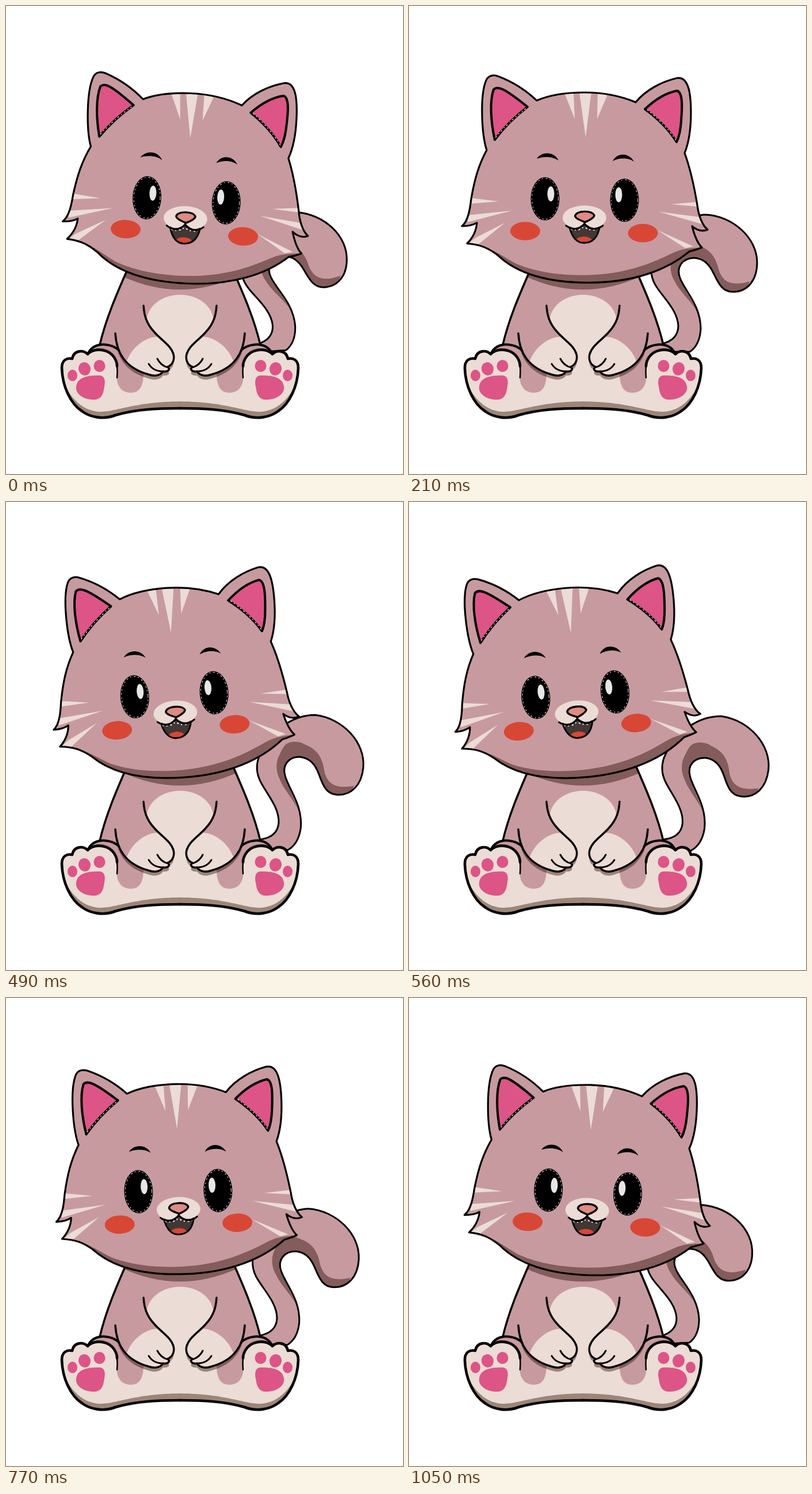
Write an HTML page with a canvas that moves like this. It is 690 by 812 pixels and loops after 1.12 s.

```html
<!DOCTYPE html>
<html lang="en">
<head>
<meta charset="utf-8">
<title>Kitten</title>
<style>
html, body { margin: 0; width: 100%; height: 100%; overflow: hidden; background: #fff; }
canvas { display: block; }
</style>
</head>
<body>
<canvas id="stage" width="690" height="812"></canvas>
<script>
const ctx = document.getElementById('stage').getContext('2d');
const FUR = '#c79aa0', SHADE = '#835c5b', CREAM = '#ebdcd5', DUSK = '#9b8679';
const PINK = '#dc5586', RED = '#d84735', INK = '#000';
const STEP = 70, HALF = 8, MID = 605;
const rad = Math.PI / 180;

function fill(d, color) {
  ctx.fillStyle = color;
  ctx.fill(new Path2D(d));
}

function line(d, width = 3.5, color = INK) {
  ctx.lineWidth = width;
  ctx.strokeStyle = color;
  ctx.stroke(new Path2D(d));
}

function oval(x, y, rx, ry, color, tilt = 0) {
  ctx.beginPath();
  ctx.ellipse(x, y, rx, ry, tilt * rad, 0, 7);
  ctx.fillStyle = color;
  ctx.fill();
}

function inside(d, draw) {
  ctx.save();
  ctx.clip(new Path2D(d));
  draw();
  ctx.restore();
}

function turned(x, y, deg, draw) {
  ctx.save();
  ctx.translate(x, y);
  ctx.rotate(deg * rad);
  ctx.translate(-x, -y);
  draw();
  ctx.restore();
}

function bothSides(draw) {
  draw();
  ctx.save();
  ctx.translate(MID, 0);
  ctx.scale(-1, 1);
  draw();
  ctx.restore();
}

function dashes(draw) {
  ctx.save();
  ctx.setLineDash([3, 4, 2, 5]);
  ctx.lineCap = 'butt';
  draw();
  ctx.restore();
}

// Darkens whatever lies just below a shape.
function castShadow(d, drop) {
  ctx.save();
  ctx.globalCompositeOperation = 'multiply';
  ctx.translate(0, drop);
  fill(d, '#a89892');
  ctx.restore();
}

const TAIL = 'M513,362 C562,363 605,402 605,445 C605,475 589,496 563,496 C546,496 539,484 530,465 ' +
  'C521,446 511,438 495,437 C474,438 464,454 471,472 C480,495 507,520 507,560 C506,580 500,592 488,600 ' +
  'L440,600 L440,586 C460,581 468,570 468,555 C467,530 446,510 432,490 C419,472 418,455 425,437 C437,400 472,366 513,362 Z';

function tail() {
  fill(TAIL, FUR);
  inside(TAIL, () => fill('M502,532 C487,508 470,495 462,478 C452,462 454,445 458,437 C462,424 466,416 473,414 ' +
    'C483,410 493,411 501,415 C517,420 526,428 531,438 C538,450 537,458 542,466 C549,480 564,486 592,478 ' +
    'L580,510 L540,500 L528,465 L495,438 L468,470 Z', SHADE));
  line(TAIL, 3);
}

const TORSO = 'M212,455 C196,492 174,540 163,592 L180,620 L425,620 L442,592 C431,540 409,492 393,455 Z';
const EDGE = 'M193,625 C193,615 186,602 172,598 C160,594 147,598 142,604 C134,596 118,597 115,612 ' +
  'C106,610 97,614 97,628 C98,660 112,690 132,703 C147,714 170,718 190,710 C225,700 260,698 304,698';
const BASE = EDGE + ' L304,590 L240,590 Z';
const ARM = 'M190,568 C192,600 205,628 250,640 C261,643 269,640 273,634 C283,635 286,630 281,626 ' +
  'C291,622 293,612 291,604 C286,588 270,580 258,566 C243,550 240,535 239,520';

function base() {
  fill(BASE, CREAM);
  inside(BASE, () => fill('M96,645 C113,685 135,702 162,704 C195,704 220,687 304,686 L304,720 L90,720 Z', DUSK));
}

function limbs() {
  const hip = 'M143,602 C150,588 165,586 176,588 C190,590 198,597 204,607';
  fill(hip + ' L193,645 C194,622 186,602 172,598 C160,594 147,598 143,602 Z', FUR);
  fill('M192,600 L193,650 C196,665 205,671 217,671 C232,671 239,660 239,636 L239,600 Z', FUR);
  line(hip, 4);
  line(EDGE, 4.6);
  line('M193,622 Q194,634 193,645', 2.5);

  oval(115.5, 641, 8.5, 10, PINK);
  oval(136.5, 629.5, 10.5, 11.5, PINK, -15);
  oval(162.5, 624.5, 10, 10.5, PINK);
  fill('M122,660 C124,645 140,641 160,641 C172,640 173,650 171,660 C169,675 165,684 150,683 C133,682 120,672 122,660 Z', PINK);

  castShadow(ARM + ' Z', 7);
  fill(ARM + ' Z', FUR);
  inside(ARM + ' Z', () => fill('M208,622 C217,590 246,572 268,574 L300,600 L290,645 L240,650 Z', CREAM));
  line(ARM);
  line('M263,612 Q269,624 281,627 M248,621 Q256,634 273,634', 3);
}

function body() {
  fill(TORSO, FUR);
  inside(TORSO, () => fill('M200,468 Q302,516 405,468 L405,440 L200,440 Z', SHADE));
  line('M212,455 C196,492 174,540 163,588 M393,455 C409,492 431,540 442,588');
  oval(302.5, 547, 58, 46, CREAM);
  fill('M246,550 H359 V620 H246 Z', CREAM);
  bothSides(base);
  bothSides(limbs);
}

const HEAD = 'M135,250 C126,222 123,155 134,129 C138,120 147,119 155,122 C179,131 203,146 222,164 ' +
  'C245,154 275,150 305,150 C340,150 370,157 394,167 C412,145 440,131 466,125 C486,122 490,152 490,185 ' +
  'C490,215 486,238 479,255 C490,285 496,315 501,345 C503,362 509,380 519,388 C510,392 500,389 492,382 ' +
  'C496,398 501,411 509,419 C502,422 495,424 487,426 C450,457 392,480 312,480 C245,480 190,466 155,433 ' +
  'C138,420 125,414 101,412 C111,402 117,390 118,376 C110,381 101,382 92,382 C103,373 106,352 108,335 C114,300 121,276 135,250 Z';
const EARS = ['M147,145 C154,138 165,142 206,175 C184,192 164,212 149,232 C142,200 140,165 147,145 Z',
  'M410,179 C430,160 450,150 466,147 C476,150 475,175 473,200 C472,215 469,228 465,236 C452,215 432,195 410,179 Z'];
const STRIPES = 'M271,153 L286,151 L288,196 Z M296,149 H317 L307,228 Z M328,151 L345,154 L327,196 Z ' +
  'M106,333 L106,343 L156,339 Z M102,363 L102,375 L179,355 Z M102,413 L116,402 L167,376 L121,413 Z ' +
  'M502,340 L502,348 L455,344 Z M504,366 L512,379 L434,357 Z M494,417 L480,420 L432,389 Z';

function eye(x, y, glintX, glintY) {
  oval(x, y, 25, 37.5, INK);
  dashes(() => {
    ctx.beginPath();
    ctx.ellipse(x, y, 23, 35.5, 0, 0, 7);
    ctx.lineWidth = 1;
    ctx.strokeStyle = '#fff';
    ctx.stroke();
  });
  oval(glintX, glintY, 6, 13, '#e6e6e6');
}

function mouth() {
  oval(305, 367.5, 38, 21.5, CREAM);
  const jaw = 'M279,384 Q292,391 305,378 Q318,391 331,384 C328,401 319,411 304,411 C290,411 283,400 279,384 Z';
  fill(jaw, '#423735');
  inside(jaw, () => oval(304, 409, 15, 9, RED));
  line(jaw, 3);
  dashes(() => line('M281,387 Q293,392 304,383 Q317,392 328,387', 2, '#fff'));
  line('M273,381 Q290,394 305,378 Q320,394 337,381 M305,372 V379', 3);
  const nose = 'M289,363 C293,355 317,354 322,363 C322,367 313,372 306,375 C298,372 287,368 289,363 Z';
  fill(nose, '#df8a82');
  line(nose, 3.4);
}

function head() {
  fill(HEAD, FUR);
  inside(HEAD, () => {
    fill(STRIPES, CREAM);
    fill('M101,412 C140,414 160,434 188,448 C225,463 265,467 305,467 C375,466 420,447 455,430 ' +
      'C475,420 490,420 509,419 L480,485 L150,485 Z', SHADE);
  });
  line(HEAD, 3.2);
  for (const ear of EARS) {
    fill(ear, PINK);
    line(ear, 4);
  }
  dashes(() => line('M203,178 C183,193 165,211 150,229 M414,180 C434,196 452,215 464,233', 1.2, '#fff'));
  fill('M222,265 C231,252 252,252 260,268 C250,261 235,260 222,265 Z', INK);
  fill('M354,269 C362,254 382,254 391,270 C381,263 366,263 354,269 Z', INK);
  eye(236.5, 334.5, 246.5, 326);
  eye(374.5, 337, 364.5, 327.5);
  oval(202, 390.5, 26, 16, RED);
  oval(406.5, 394, 26, 16, RED);
  mouth();
}

// The head starts its swing a little slower than it ends.
const swing = k => k * (0.87 + 0.0186 * k);

function frame(now) {
  const k = HALF - Math.abs(Math.floor(now / STEP) % (2 * HALF) - HALF);
  ctx.fillStyle = '#fff';
  ctx.fillRect(0, 0, 690, 812);
  ctx.lineJoin = ctx.lineCap = 'round';
  turned(448, 617, (k - 3) * 1.39, tail);
  body();
  turned(280, 522, (swing(3) - swing(k)) * 0.93, head);
}

const start = performance.now();
function loop() {
  frame(performance.now() - start);
  requestAnimationFrame(loop);
}
loop();
</script>
</body>
</html>
```
